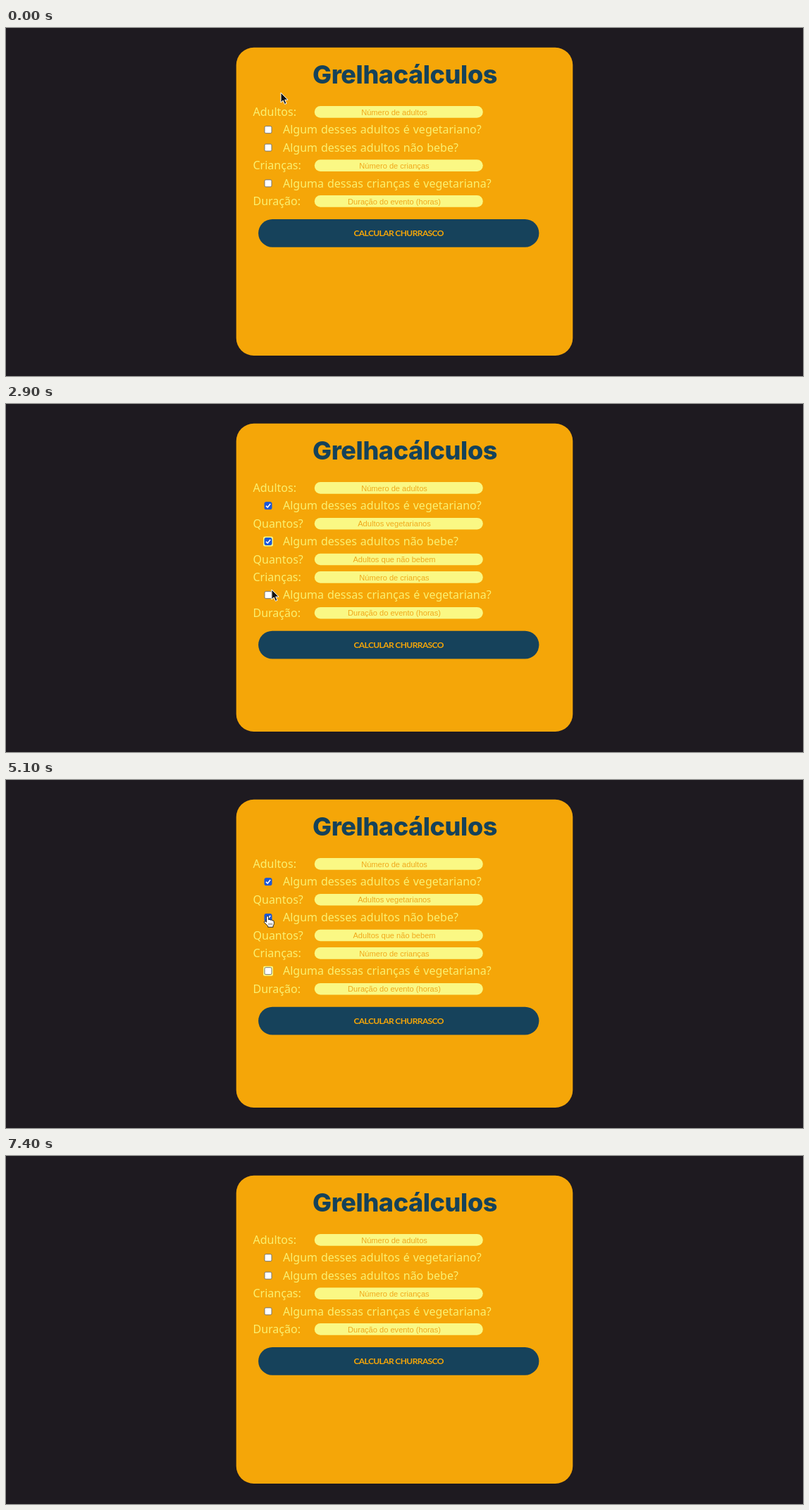
An HTML page for the animation above (7.5 s loop, 1131x495 px).

```html
<!DOCTYPE html>
<html lang="pt-BR">
<head>
<meta charset="utf-8">
<title>Grelhacálculos</title>
<style>
  html, body { margin: 0; width: 100%; height: 100%; overflow: hidden; background: #1e1a20; }
  svg { display: block; }
  .title { font: 800 36px Inter, sans-serif; letter-spacing: -.4px; fill: #15425a; text-anchor: middle; }
  .label { font: 16px "Noto Sans", sans-serif; word-spacing: .8px; fill: #faf070; }
  .hint { font: 11.1px "Liberation Sans", Arial, sans-serif; fill: #f0a81c; text-anchor: middle; }
  .action { font: 700 12px Lato, sans-serif; letter-spacing: -.6px; fill: #f5a608; text-anchor: middle; }
</style>
</head>
<body>
<svg width="1131" height="495" viewBox="0 0 1131 495">
  <rect x="326.7" y="27.8" width="477.6" height="438.2" rx="25" fill="#f5a608"/>
  <text class="title" x="566" y="79">Grelhacálculos</text>
  <g id="rows"></g>
  <g id="button">
    <rect x="358.1" y="-19.9" width="398.3" height="39.8" rx="19.9" fill="#16425b"/>
    <text class="action" x="557.2" y="4.6">CALCULAR CHURRASCO</text>
  </g>
  <g id="cursor" stroke-linejoin="round">
    <path id="arrow" d="M0 0V14L3.2 11.1 5.5 16.4 8 15.3 5.7 10.2H10Z" fill="#111" stroke="#fff"/>
    <g id="hand" transform="translate(0 -.4) scale(.95)">
      <path d="M-1.6 9V1.2Q-1.4 0 0 0T1.7 1.3V5.3Q3.5 4.2 4.6 5.9 6.3 5 7.3 6.7 9.8 6 9.8 8.6V11.5Q9.5 13.5 8.5 14.3V16.5H.8V15L-4.8 9.4Q-5.1 7.2-3.2 7.5Z" fill="#fff" stroke="#1b1b1b"/>
      <path d="M2.2 10.5V13.5M4.4 10.5V13.5M6.6 10.5V13.5" stroke="#333" stroke-width=".8"/>
    </g>
  </g>
</svg>
<script>
const LOOP = 7500, STEP = 100, TOP = 119.3, PITCH = 25.4, BOX_X = 372;
const $ = id => document.getElementById(id);

// Each option is checked between the two times; its detail row shows meanwhile.
const checkedSpans = [[1500, 6400], [2500, 5600], [3800, 4100]];
const focusChanges = [[0, -1], [1300, 0], [2300, 1], [3700, 2], [5500, 1], [6300, 0], [7400, -1]];

// Cursor moves: first step, last step, destination x and y.
const start = [390, 92];
const moves = [
  [400, 900, 372.5, 143.5],
  [1700, 2100, 377, 193.5],
  [2600, 2900, 377, 264],
  [3000, 3200, 377.8, 269],
  [3300, 3300, 377, 268.5],
  [3500, 3500, 376, 268.5],
  [4000, 4500, 375, 273.5],
  [4700, 5100, 371, 194],
  [5900, 6200, 372, 143.5],
  [6800, 7000, 87.5, 21.5]
];

const field = (label, hint, owner) => ({ owner, markup: `
  <text class="label" x="350.5" y="5.9">${label}</text>
  <rect x="437.8" y="-8.2" width="239" height="16.6" rx="8.3" fill="#faf884"/>
  <text class="hint" x="551" y="4.2">${hint}</text>` });

const option = (label, box) => ({ box, markup: `
  <rect class="ring" x="365" y="-7" width="14" height="14" rx="2.5" fill="#faf884"/>
  <rect class="box" x="367" y="-5" width="10" height="10" rx="1.8"/>
  <path class="tick" d="M369 .2L371.2 2.4 375.2-2.6" fill="none" stroke="#fff" stroke-width="1.6"/>
  <text class="label" x="393" y="5.7">${label}</text>` });

const rows = [
  field("Adultos:", "Número de adultos"),
  option("Algum desses adultos é vegetariano?", 0),
  field("Quantos?", "Adultos vegetarianos", 0),
  option("Algum desses adultos não bebe?", 1),
  field("Quantos?", "Adultos que não bebem", 1),
  field("Crianças:", "Número de crianças"),
  option("Alguma dessas crianças é vegetariana?", 2),
  field("Quantas?", "Crianças vegetarianas", 2),
  field("Duração:", "Duração do evento (horas)")
];
$("rows").innerHTML = rows.map(row => `<g>${row.markup}</g>`).join("");
rows.forEach((row, i) => row.node = $("rows").children[i]);

const show = (node, on) => node.setAttribute("visibility", on ? "visible" : "hidden");
const place = (node, x, y) => node.setAttribute("transform", `translate(${x} ${y})`);

function cursorAt(time) {
  let [x, y] = start;
  for (const [first, last, toX, toY] of moves) {
    if (time < first) break;
    const progress = Math.min(1, (time - first + STEP) / (last - first + STEP));
    const eased = progress * (2 - progress);
    x += (toX - x) * eased;
    y += (toY - y) * eased;
  }
  return [x, y];
}

function draw(time) {
  const checked = checkedSpans.map(([on, off]) => time >= on && time < off);
  const focused = focusChanges.filter(([at]) => time >= at).pop()[1];
  const [x, y] = cursorAt(time);
  let count = 0, overBox = false;

  for (const { node, owner, box } of rows) {
    const visible = owner === undefined || checked[owner];
    node.style.display = visible ? "" : "none";
    if (!visible) continue;
    const center = TOP + PITCH * count++;
    place(node, 0, center);
    if (box === undefined) continue;
    const square = node.querySelector(".box");
    square.setAttribute("fill", checked[box] ? "#1b57d8" : "#fff");
    square.setAttribute("stroke", checked[box] ? "#1b57d8" : "#767676");
    show(node.querySelector(".tick"), checked[box]);
    show(node.querySelector(".ring"), focused === box);
    overBox ||= Math.abs(x - BOX_X) <= 6 && Math.abs(y - center) <= 7;
  }

  place($("button"), 0, 291.8 + PITCH * (count - 6));
  place($("cursor"), x, y);
  $("cursor").style.display = time < 7200 ? "" : "none";
  show($("arrow"), !overBox);
  show($("hand"), overBox);
}

const began = performance.now();
function tick() {
  const time = (performance.now() - began) % LOOP;
  draw(Math.floor(time / STEP) * STEP);
  requestAnimationFrame(tick);
}
tick();
</script>
</body>
</html>
```
